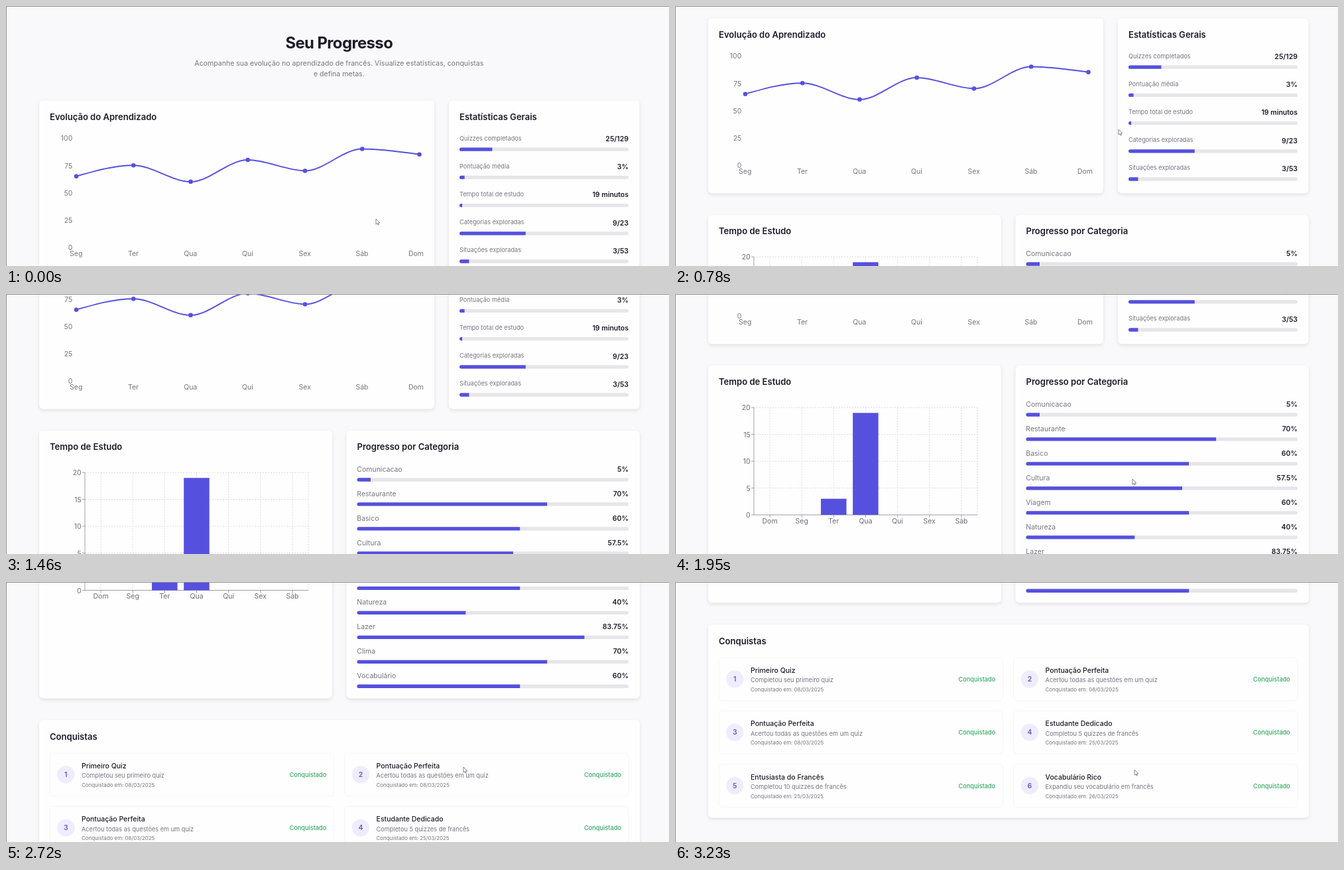
Recreate the animation shown at these times as an HTML page. Size 1000 px wide and 392 px high, loop 3.31 s.

```html
<!DOCTYPE html>
<html lang="pt-BR">
<head>
<meta charset="utf-8">
<title>Seu Progresso</title>
<style>
  html, body { margin: 0; width: 100%; height: 100%; overflow: hidden; background: #f9f9fb; }
  svg { display: block; width: 100vw; height: 100vh; font-family: Inter, sans-serif; }
  .card { fill: #fefefe; filter: drop-shadow(0 2.5px 2.5px rgba(20, 20, 40, .11)); }
  .item { fill: #fefefe; stroke: #f1f1f4; stroke-width: .7; }
</style>
</head>
<body>
<svg id="stage" viewBox="0 0 1000 392"></svg>
<script>
const LOOP = 3310;
const INK = '#1b1c28', MUTED = '#757680', INDIGO = '#5550de', TRACK = '#e6e6ea', GREEN = '#36a964';
const stage = document.getElementById('stage');

function add(parent, tag, attrs, content) {
  const el = document.createElementNS('http://www.w3.org/2000/svg', tag);
  for (const key in attrs) el.setAttribute(key, attrs[key]);
  if (content !== undefined) el.textContent = content;
  parent.appendChild(el);
  return el;
}

const page = add(stage, 'g', {});

// Text is placed by the vertical centre of its capitals.
function text(x, y, size, content, fill = MUTED, weight = 400, anchor = 'start', extra = {}) {
  add(page, 'text', {
    x, y: y + size * .364, 'font-size': size, 'font-weight': weight,
    'text-anchor': anchor, fill, ...extra
  }, content);
}

function card(x, y, right, bottom, title) {
  add(page, 'rect', { class: 'card', x, y, width: right - x, height: bottom - y, rx: 6 });
  text(x + 16, y + 24.7, 13.05, title, INK, 600);
}

function progress(x, right, y, share) {
  const h = 5.3, r = h / 2, w = (right - x) * share;
  add(page, 'rect', { x, y: y - r, width: right - x, height: h, rx: r, fill: TRACK });
  add(page, 'path', {
    d: `M${x + w} ${y - r}H${x + r}a${r} ${r} 0 0 0 0 ${h}H${x + w}Z`, fill: INDIGO
  });
}

function line(x1, y1, x2, y2, stroke, extra = {}) {
  add(page, 'line', { x1, y1, x2, y2, stroke, 'stroke-width': .75, ...extra });
}

function header() {
  text(502.3, 55, 23.9, 'Seu Progresso', INK, 700, 'middle', { 'letter-spacing': '-.025em' });
  text(502.3, 86.2, 10.55, 'Acompanhe sua evolução no aprendizado de francês. Visualize estatísticas, conquistas', MUTED, 400, 'middle');
  text(502.3, 102, 10.55, 'e defina metas.', MUTED, 400, 'middle');
}

function learningChart() {
  card(50, 142.4, 646, 406.5, 'Evolução do Aprendizado');
  const days = ['Seg', 'Ter', 'Qua', 'Qui', 'Sex', 'Sáb', 'Dom'];
  const step = 86.25, yOf = v => 363.8 - 1.648 * v;
  const pts = [65, 75, 60, 80, 70, 90, 85].map((v, i) => [106 + i * step, yOf(v)]);

  for (let v = 0; v <= 100; v += 25) text(100.3, yOf(v) + .6, 10.5, v, MUTED, 400, 'end');
  days.forEach((day, i) => i < 6
    ? text(105.7 + i * step, 373, 10.5, day, MUTED, 400, 'middle')
    : text(630, 373, 10.5, day, MUTED, 400, 'end'));

  // Inner points are all extrema, so only the two ends have a slope.
  let d = `M${pts[0]}`;
  for (let i = 1; i < pts.length; i++) {
    const [x0, y0] = pts[i - 1], [x1, y1] = pts[i], half = (y1 - y0) / 2;
    const a = i === 1 ? half : 0, b = i === pts.length - 1 ? half : 0;
    d += `C${x0 + step / 3} ${y0 + a} ${x1 - step / 3} ${y1 - b} ${x1} ${y1}`;
  }
  add(page, 'path', { d, fill: 'none', stroke: INDIGO, 'stroke-width': 1.9 });
  for (const [cx, cy] of pts) add(page, 'circle', { cx, cy, r: 3.3, fill: INDIGO });
}

function generalStats() {
  card(668, 142.4, 955.5, 406.5, 'Estatísticas Gerais');
  [
    ['Quizzes completados', '25/129', 25 / 129],
    ['Pontuação média', '3%', .03],
    ['Tempo total de estudo', '19 minutos', .016],
    ['Categorias exploradas', '9/23', 9 / 23],
    ['Situações exploradas', '3/53', 3 / 53]
  ].forEach(([label, value, share], i) => {
    const y = 199.2 + i * 42.2;
    text(684, y, 9.2, label);
    text(939, y + .9, 10.5, value, INK, 600, 'end');
    progress(684, 939, y + 17, share);
  });
}

function studyTime() {
  card(50, 439, 492, 827, 'Tempo de Estudo');
  const left = 119, right = 456, top = 502.2, base = 664, slot = (right - left) / 7;
  const yOf = v => base - v * (base - top) / 20;
  const dash = { 'stroke-dasharray': '2 2' }, grid = '#d2d2d6', axis = '#85868c';
  const xs = ['Dom', 'Seg', 'Ter', 'Qua', 'Qui', 'Sex', 'Sáb'].map((day, i) => {
    const x = left + slot * (i + .5);
    text(x, 673, 10.5, day, '#6d6e76', 400, 'middle');
    line(x, top, x, base, grid, dash);
    line(x, base, x, base + 4, axis);
    return x;
  });
  line(right, top, right, base, grid, dash);
  for (let v = 0; v <= 20; v += 5) {
    line(left, yOf(v), right, yOf(v), grid, dash);
    line(left - 4, yOf(v), left, yOf(v), axis);
    text(113.7, yOf(v) + .2, 10.5, v, '#6d6e76', 400, 'end');
  }
  line(left, top, left, base, axis);
  line(left, base, right, base, axis);
  for (const [i, v] of [[2, 3], [3, 19]]) {
    add(page, 'rect', { x: xs[i] - 19.3, y: yOf(v), width: 38.5, height: base - yOf(v), fill: INDIGO });
  }
}

function categories() {
  card(513.5, 439, 956, 827, 'Progresso por Categoria');
  [
    ['Comunicacao', 5], ['Restaurante', 70], ['Basico', 60], ['Cultura', 57.5], ['Viagem', 60],
    ['Natureza', 40], ['Lazer', 83.75], ['Clima', 70], ['Vocabulário', 60]
  ].forEach(([label, value], i) => {
    const y = 497.2 + i * 36.97;
    text(529.3, y, 10.5, label);
    text(939, y, 10.5, value + '%', INK, 600, 'end');
    progress(529.5, 939, y + 15.8, value / 100);
  });
}

function achievements() {
  card(50, 859.6, 956, 1151, 'Conquistas');
  [
    ['Primeiro Quiz', 'Completou seu primeiro quiz', '08/03/2025'],
    ['Pontuação Perfeita', 'Acertou todas as questões em um quiz', '08/03/2025'],
    ['Pontuação Perfeita', 'Acertou todas as questões em um quiz', '08/03/2025'],
    ['Estudante Dedicado', 'Completou 5 quizzes de francês', '25/03/2025'],
    ['Entusiasta do Francês', 'Completou 10 quizzes de francês', '25/03/2025'],
    ['Vocabulário Rico', 'Expandiu seu vocabulário em francês', '26/03/2025']
  ].forEach(([title, detail, date], i) => {
    const x = 66 + (i % 2) * 444.6, y = 909.5 + Math.floor(i / 2) * 80.3;
    add(page, 'rect', { class: 'item', x, y, width: 428.5, height: 65, rx: 5.5 });
    add(page, 'circle', { cx: x + 24.3, cy: y + 32.3, r: 13.2, fill: '#efedfd' });
    text(x + 24.3, y + 32.3, 10.5, i + 1, '#6657d2', 600, 'middle');
    text(x + 48, y + 19.2, 10.5, title, INK, 500);
    text(x + 48, y + 34, 9.2, detail);
    text(x + 48, y + 48.3, 7.9, 'Conquistado em: ' + date);
    text(x + 417.3, y + 32.8, 9.2, 'Conquistado', GREEN, 500, 'end');
  });
}

[header, learningChart, generalStats, studyTime, categories, achievements].forEach(draw => draw());

const cursor = add(stage, 'path', {
  d: 'M0 0V8.2L1.9 6.5 3.1 9.2 4.4 8.6 3.2 6H5.8Z',
  fill: '#fff', stroke: '#66676c', 'stroke-width': .8
});
add(stage, 'path', { d: 'M0 .5H1000M.5 0V392', stroke: '#929297', 'stroke-width': 1 });

// Wheel bursts: the picture refreshes only at these times.
const refreshes = [
  0, 120, 210,
  510, 560, 610, 660, 720, 780, 890, 970,
  1090, 1180, 1270, 1360, 1460, 1560,
  1660, 1760, 1860, 1950, 2030, 2130,
  2220, 2320, 2420, 2520, 2620, 2720,
  3000, 3060, 3120, 3180, 3230
];
const scrollKeys = [
  [0, 0], [470, 0], [780, 124], [970, 130.5], [1040, 130.5], [1460, 233], [1560, 261],
  [1610, 261], [1950, 331], [2130, 391], [2170, 391], [2320, 462], [2720, 651.5],
  [2950, 651.5], [3230, 795.5], [LOOP, 795.5]
];
const cursorKeys = [[0, 558, 321], [120, 610, 258], [210, 669, 186], [1660, 690, 279], [3000, 693, 283]];

const slope = i => (scrollKeys[i + 1][1] - scrollKeys[i][1]) / (scrollKeys[i + 1][0] - scrollKeys[i][0]);

function tangent(i) {
  if (i === 0 || i === scrollKeys.length - 1) return 0;
  const a = slope(i - 1), b = slope(i);
  return a * b > 0 ? 2 * a * b / (a + b) : 0;
}

// Monotone cubic through the scroll keys.
function scrollAt(t) {
  let i = 0;
  while (i < scrollKeys.length - 2 && scrollKeys[i + 1][0] <= t) i++;
  const [t0, s0] = scrollKeys[i], [t1, s1] = scrollKeys[i + 1];
  const span = t1 - t0, u = (t - t0) / span, v = 1 - u;
  return s0 * v * v * (1 + 2 * u) + s1 * u * u * (3 - 2 * u)
    + span * u * v * (tangent(i) * v - tangent(i + 1) * u);
}

function render(t) {
  const shown = refreshes.filter(r => r <= t).pop();
  const [, x, y] = cursorKeys.filter(k => k[0] <= shown).pop();
  page.setAttribute('transform', `translate(0 ${-scrollAt(shown)})`);
  cursor.setAttribute('transform', `translate(${x} ${y})`);
  cursor.setAttribute('visibility', shown >= 1090 && shown < 1660 ? 'hidden' : 'visible');
}

const start = performance.now();
function tick() {
  render((performance.now() - start) % LOOP);
  requestAnimationFrame(tick);
}
tick();
</script>
</body>
</html>
```
